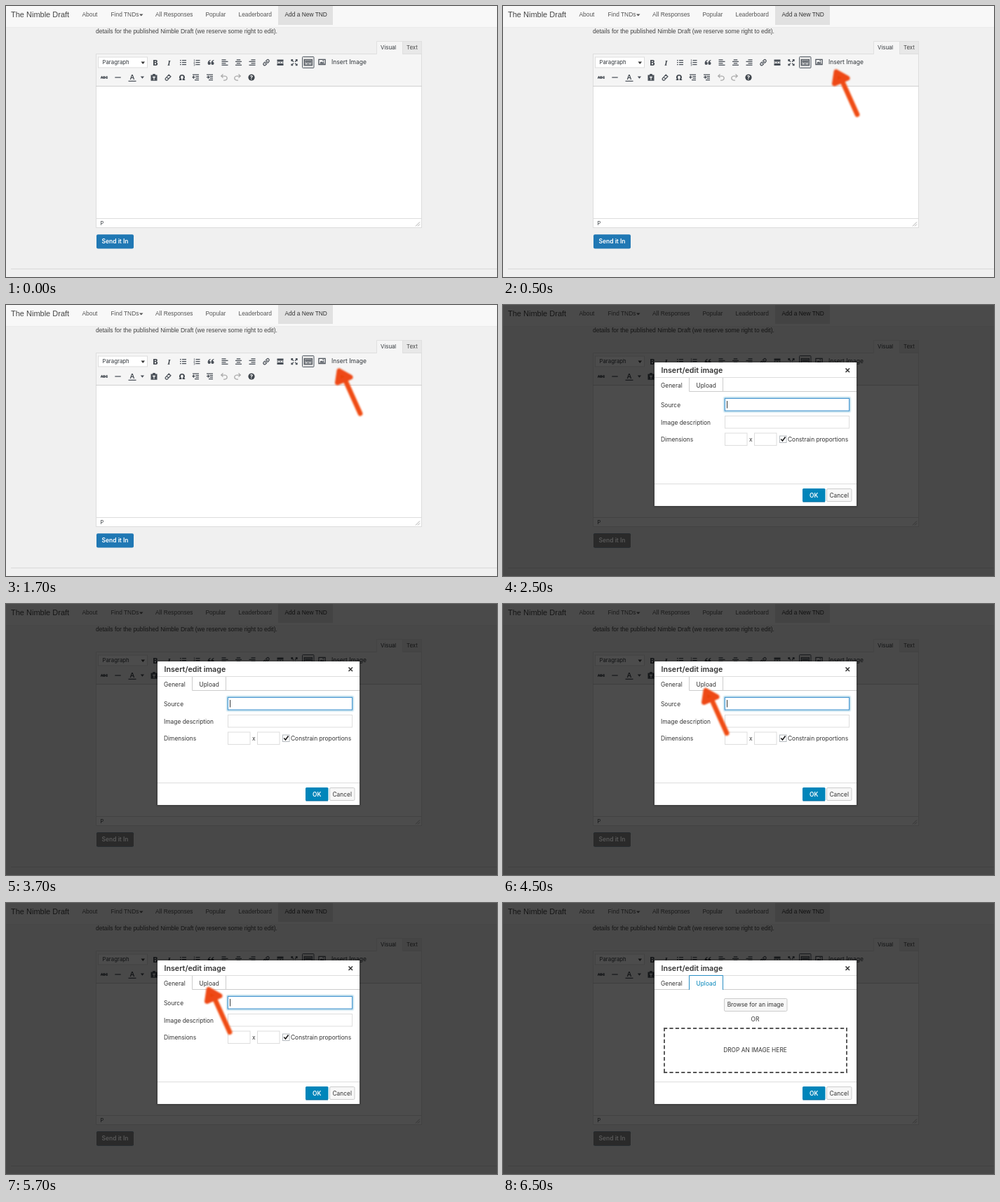
Recreate the animation shown at these times as an HTML page. Size 700 px wide and 387 px high, loop 8 s.

```html
<!DOCTYPE html>
<html lang="en">
<head>
<meta charset="utf-8">
<title>Adding an image</title>
<style>
html, body { margin: 0; width: 100%; height: 100%; overflow: hidden; background: #f0f0f0; }
svg { display: block; width: 100vw; height: 100vh; }
text { font-family: Inter, Roboto, sans-serif; font-size: 8.4px; fill: #32373c; white-space: pre; }
.page text { font-family: "Liberation Sans", Arial, sans-serif; font-size: 8.4px; fill: #555; }
.page .brand { font-size: 11px; fill: #444; }
.page .note { font-size: 8.5px; fill: #444; }
.small { font-size: 7.8px; }
.mid { text-anchor: middle; }
.bold { font-weight: 600; }
.dialog text { fill: #333; }
.dialog .white, .white { fill: #fff; }
.dialog .blue { fill: #0085ba; }
.box { fill: #fff; stroke: #ddd; }
.btn { fill: #f7f7f7; stroke: #ccc; }
.rule { fill: none; stroke: #ddd; }
.icons path { fill: none; stroke: #4a5058; stroke-width: 1.25; }
.icons path.solid { fill: #4a5058; stroke: none; }
.icons path.off { stroke: #aaa; }
.icons path.thin { stroke-width: .6; }
.icons text { fill: #40464d; text-anchor: middle; }
.layer { opacity: 0; }
</style>
</head>
<body>
<svg viewBox="0 0 700 387" preserveAspectRatio="none">
  <defs>
    <filter id="soft" x="-40%" y="-40%" width="180%" height="180%"><feGaussianBlur stdDeviation="1.2"/></filter>
    <filter id="glow" x="-5%" y="-40%" width="110%" height="180%"><feGaussianBlur stdDeviation=".8"/></filter>
    <g id="arrow" stroke-linecap="round" stroke-linejoin="round" filter="url(#soft)">
      <path d="M483 106L505 155" fill="none" stroke="#f4571f" stroke-width="7"/>
      <path d="M475 94L472.500 111L491 103Z" fill="#e8420c" stroke="#ee4a14" stroke-width="7"/>
      <path d="M483 106L505 155" fill="none" stroke="#ee4a14" stroke-width="3.500"/>
    </g>
  </defs>

  <rect width="700" height="387" fill="#f0f0f0"/>

  <g class="page">
    <rect width="700" height="30" fill="#f8f8f8"/>
    <path d="M0 30.500H700" stroke="#ebebeb"/>
    <rect x="388" width="78" height="27" fill="#e1e1e1"/>
    <text class="brand" x="7" y="15.500">The Nimble Draft</text>
    <text x="108.500" y="15">About</text>
    <text x="149.500" y="15">Find TNDs</text>
    <path d="M190 11.500H195.500L192.750 14.500Z" fill="#555"/>
    <text x="213" y="15">All Responses</text>
    <text x="284.500" y="15">Popular</text>
    <text x="331.500" y="15">Leaderboard</text>
    <text x="397.500" y="15" style="fill:#333">Add a New TND</text>
    <text class="note" x="128" y="38.500">details for the published Nimble Draft (we reserve some right to edit).</text>
    <path d="M7 375.500H700" stroke="#d9d9d9"/>
  </g>

  <g class="editor">
    <rect x="565.500" y="50.500" width="27" height="18" fill="#e8e8e8" stroke="#e0e0e0"/>
    <rect x="128.500" y="68.500" width="464" height="248" class="box"/>
    <rect x="129" y="69" width="463" height="45" fill="#f5f5f5"/>
    <path class="rule" d="M128 114.500H593" style="stroke:#d0d0d0"/>
    <path class="rule" d="M128 303.500H593"/>
    <path d="M528.500 69V50.500H565.500V69" fill="#f5f5f5" stroke="#e0e0e0"/>
    <text class="small" x="534" y="62">Visual</text>
    <text class="small" x="571" y="62" style="fill:#484848">Text</text>
    <text x="134.500" y="313" style="font-size:7.5px">P</text>
    <path d="M584 314.500L590 308.500M587 314.500L590 311.500" stroke="#999" stroke-width=".8"/>
    <rect x="131.500" y="73" width="70" height="15" class="box"/>
    <text class="small" x="137.500" y="83.300">Paragraph</text>
    <path d="M192.500 79.500H198L195.250 83Z" fill="#333"/>
    <rect x="422.500" y="72.500" width="16.500" height="16" rx="1" fill="#e4e4e4" stroke="#555d66"/>
    <text x="464" y="83.300" style="font-size:8.500px">Insert Image</text>
    <g class="icons" id="icons">
      <text x="213" y="84.700" style="font:800 10.500px Inter,sans-serif">B</text>
      <text x="232.500" y="84.700" style="font:italic 700 11px 'Liberation Serif',serif">I</text>
      <text x="140" y="104" style="font:700 5px Inter,sans-serif">ABC</text>
      <text x="180" y="105" style="font:600 9.500px Inter,sans-serif">A</text>
      <text x="251" y="105.500" style="font:600 10.500px 'DejaVu Sans',sans-serif">Ω</text>
      <path class="solid" d="M191.800 100.500H197L194.400 103.700Z"/>
      <circle cx="350" cy="102" r="4.600" fill="#40464d"/>
      <text x="350" y="104.700" style="font:800 7.500px Inter,sans-serif;fill:#fff">?</text>
    </g>
    <rect x="129" y="326.300" width="53" height="20.200" rx="2" fill="#2078b4"/>
    <text class="mid bold white" x="155.500" y="339.300" style="font-size:8.500px">Send it In</text>
  </g>

  <g class="layer" data-show="500 2500"><use href="#arrow"/></g>

  <g class="layer dialog" data-show="2500 8000">
    <rect width="700" height="387" fill="#000" opacity=".7"/>
    <rect x="129" y="326.300" width="53" height="20.200" rx="2" fill="#2a2a2a"/>
    <text class="mid bold" x="155.500" y="339.300" style="font-size:8.500px;fill:#595959">Send it In</text>
    <rect x="214.500" y="80.500" width="291" height="208" fill="#000" opacity=".18" filter="url(#glow)"/>
    <rect x="216" y="82" width="288" height="205" fill="#fff"/>
    <text class="bold" x="225.500" y="97" style="font-size:10.700px">Insert/edit image</text>
    <path d="M488.500 90.500L494 96M494 90.500L488.500 96" stroke="#333" stroke-width="1.500"/>
    <path class="rule" d="M216 103.500H504M216 255.500H504"/>
    <text x="225" y="117.500">General</text>
    <rect x="427" y="262" width="32.500" height="19" rx="1.500" fill="#0085ba"/>
    <path d="M427.500 281H459" stroke="#006799"/>
    <text class="mid bold white" x="443.200" y="274.700">OK</text>
    <rect x="461.500" y="262.500" width="35.500" height="18" rx="1.500" class="btn"/>
    <text class="mid" x="479.200" y="274.700">Cancel</text>
  </g>

  <g class="layer dialog" data-show="2500 6500">
    <path class="rule" d="M265.500 104V123.500H504M313.500 104V123" style="stroke:#ccc"/>
    <text x="275.500" y="117.500">Upload</text>
    <text x="225" y="146">Source</text>
    <text x="225" y="170.500">Image description</text>
    <text x="225" y="195">Dimensions</text>
    <rect x="316" y="133" width="178" height="18.500" fill="none" stroke="#1e8cbe" stroke-width="2" opacity=".6" filter="url(#glow)"/>
    <rect x="316.500" y="133.500" width="177" height="17.500" fill="#fff" stroke="#4a97d2"/>
    <path d="M319.500 137V147.500" stroke="#333"/>
    <rect x="316.500" y="158.500" width="177" height="17.500" class="box"/>
    <rect x="316.500" y="183" width="31.500" height="17.500" class="box"/>
    <rect x="358.500" y="183" width="31.500" height="17.500" class="box"/>
    <text class="mid" x="353.300" y="195">x</text>
    <rect x="394.500" y="187" width="9.500" height="9.500" fill="#fff" stroke="#b4b9be"/>
    <path d="M396.300 191.500L398.500 194L402.500 188.500" fill="none" stroke="#222" stroke-width="1.700"/>
    <text x="406" y="195">Constrain proportions</text>
  </g>

  <g class="layer" data-show="4500 6500"><use href="#arrow" x="-186" y="29.500"/></g>

  <g class="layer dialog" data-show="6500 8000">
    <path class="rule" d="M216 123.500H265.500M313.500 123.500H504" style="stroke:#ccc"/>
    <path class="rule" d="M265.500 124V103.500H313.500V124" style="stroke:#2a8fc4"/>
    <text class="blue" x="275.500" y="117.500">Upload</text>
    <rect x="315.500" y="136.500" width="89.500" height="18" rx="1.500" class="btn"/>
    <text class="mid" x="360" y="148.300" style="font-size:8.300px">Browse for an image</text>
    <text class="mid" x="359.500" y="169.300">OR</text>
    <path d="M229 179H491M229 242H491M230 178V243M490 178V243" fill="none" stroke="#555" stroke-width="1.900" stroke-dasharray="5.200 3.200"/>
    <text class="mid" x="359.500" y="213">DROP AN IMAGE HERE</text>
  </g>
</svg>
<script>
const LOOP = 8000;
const iconBox = document.getElementById('icons');

function icon(x, y, d, kind = '') {
  const p = document.createElementNS('http://www.w3.org/2000/svg', 'path');
  p.setAttribute('d', d);
  p.setAttribute('class', kind);
  p.setAttribute('transform', `translate(${x} ${y})`);
  iconBox.append(p);
}

// Horizontal strokes, spaced evenly around the centre: [from, to] pairs.
const bars = (rows, gap = 2.5) => rows
  .map(([a, b], i) => `M${a} ${(i - (rows.length - 1) / 2) * gap}H${b}`).join('');

const TOP = 80.7, LOW = 102;
const listRows = bars([[-1.5, 4.5], [-1.5, 4.5], [-1.5, 4.5]], 3);
const quote = 'M4 -3.8Q0 -3 0 1.2A2.1 2.1 0 1 0 2.3 -.9Q2.3 -2 4 -2.6Z';
icon(252.5, TOP, listRows + bars([[-4.5, -2.8], [-4.5, -2.8], [-4.5, -2.8]], 3));
icon(272, TOP, listRows);
icon(268.5, TOP, 'M-.7 -3.7L0 -4.2V-1.8M-.8 -.8H.6L-.7 1H.8M-.8 2.2H.6V4.3H-.8', 'thin');
icon(287.6, TOP, quote, 'solid');
icon(292.4, TOP, quote, 'solid');
icon(312, TOP, bars([[-4.5, 1.5], [-4.5, 4.5], [-4.5, 1.5], [-4.5, 4.5]]));
icon(331.5, TOP, bars([[-2.7, 2.7], [-4.5, 4.5], [-2.7, 2.7], [-4.5, 4.5]]));
icon(351, TOP, bars([[-1.5, 4.5], [-4.5, 4.5], [-1.5, 4.5], [-4.5, 4.5]]));
icon(371, TOP, 'M-1 -1.6L1.2 -3.8Q2.4 -4.8 3.6 -3.6T3.8 -1.2L1.6 1M1 1.6L-1.2 3.8Q-2.4 4.8 -3.6 3.6T-3.8 1.2L-1.6 -1M-1.7 1.7L1.7 -1.7');
icon(391, TOP, 'M-4.5 -4.2H4.5V-1.2H-4.5ZM-4.5 1.4H4.5V4.2H-4.5ZM-4.5 -.4H-2.5V.6H-4.5ZM-1 -.4H1V.6H-1ZM2.5 -.4H4.5V.6H2.5Z', 'solid');
icon(411, TOP, 'M-4 -1.8V-4H-1.8M4 -1.8V-4H1.8M-4 1.8V4H-1.8M4 1.8V4H1.8M-3.7 -3.7L-1 -1M3.7 -3.7L1 -1M-3.7 3.7L-1 1M3.7 3.7L1 1');
icon(430.8, TOP, 'M-5.5 -4H5.5V4H-5.5ZM-4.5 -2.2H4.500M-4.5 -.4H4.5');
icon(430.8, TOP + 1.9, 'M-4.5 0H-3M-2 0H2M3 0H4.5');
icon(450.5, TOP - .7, 'M-4.6 -3.6H4.6V3.6H-4.6Z');
icon(450.5, TOP - .7, 'M-3.5 2.5L-1.3 -.8L.4 1L1.8 -.6L3.5 2.5ZM1 -2.4H2.6V-1H1Z', 'solid');

icon(140, LOW, 'M-5 .2H5');
icon(159.5, LOW, 'M-4.2 0H4.2');
icon(180, LOW + 5.3, 'M-5.5 0H5.5');
icon(211, LOW, 'M-4.5 -3.5H-1.8V-5H1.8V-3.5H4.5V4.8H-4.5ZM-2 -1.2V.2H-.6V3.4H.6V.2H2V-1.2Z', 'solid');
icon(231, LOW, 'M-3.8 1.7L1.2 -3.8L3.9 -1.2L-1.2 4.2H-2.6L-3.8 3ZM-1.8 -.4L1 2.2');
icon(270.5, LOW, 'M-4.5 -4H4.5M0 -1.5H4.5M0 1H4.5M-1.5 3.7H4.5M-.8 -.3H-4.3M-2.5 -2.2L-4.3 -.3L-2.5 1.6');
icon(290.5, LOW, 'M-4.5 -4H4.5M0 -1.5H4.5M0 1H4.5M-1.5 3.7H4.5M-4.5 -.3H-1M-2.7 -2.2L-.9 -.3L-2.7 1.6');
icon(311, LOW, 'M-1.5 -4.6L-4.3 -2L-1.5 .6M-4.2 -2H1.2Q4.2 -1.6 4.2 1T.8 4.2H-1', 'off');
icon(330, LOW, 'M1.5 -4.6L4.3 -2L1.5 .6M4.2 -2H-1.2Q-4.2 -1.6 -4.2 1T-.8 4.2H1', 'off');

for (const el of document.querySelectorAll('.layer')) {
  const [from, to] = el.dataset.show.split(' ').map(Number);
  const steps = [
    { opacity: 0, offset: 0 },
    { opacity: 1, offset: from / LOOP },
    { opacity: to < LOOP ? 0 : 1, offset: to / LOOP }
  ];
  if (to < LOOP) steps.push({ opacity: 0, offset: 1 });
  const run = el.animate(steps.map(s => ({ ...s, easing: 'step-end' })),
    { duration: LOOP, iterations: Infinity });
  run.startTime = 0;
}
</script>
</body>
</html>
```
